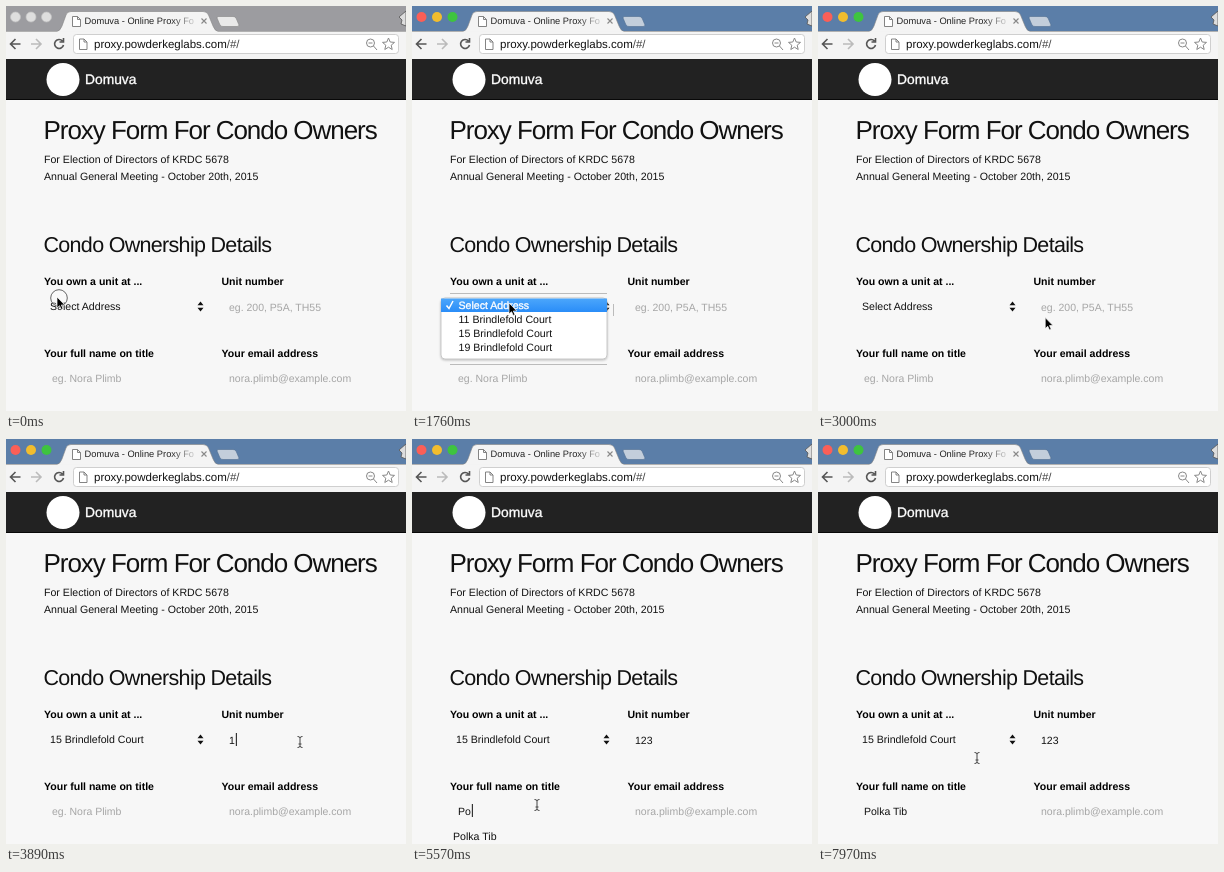
An HTML page that plays this animation: 400 by 405 pixels, repeating every 8000 ms.

```html
<!DOCTYPE html>
<html lang="en">
<head>
<meta charset="utf-8">
<title>Proxy form</title>
<style>
  html, body { margin: 0; width: 100%; height: 100%; overflow: hidden; background: #f7f7f7; }
  svg { display: block; font: 10.6px "Liberation Sans", Arial, sans-serif; fill: #111; text-rendering: geometricPrecision; }
  text { white-space: pre; }
  .label { font-weight: bold; font-size: 10.55px; fill: #000; }
  .field { font-size: 10.5px; }
  .hint { fill: #a6a6a6; }
  .line { fill: none; stroke: #555; stroke-width: 1.6; }
  #strip { fill: #9c9ca0; }
  .active #strip { fill: #5b7ea8; }
  .light { fill: #dedede; stroke: #c2c2c2; stroke-width: .7; }
  .active .light { fill: var(--on); stroke: none; }
  .shape { fill: #f4f4f4; stroke: #858585; stroke-width: .6; }
  #newTab { fill: #e9e9e9; }
  .active #newTab { fill: #c3cedb; stroke: #4f6d91; }
</style>
</head>
<body>
<svg id="stage" width="400" height="405" viewBox="0 0 400 405">
  <defs>
    <linearGradient id="fade" gradientUnits="userSpaceOnUse" x1="165" x2="189">
      <stop stop-color="#222"/><stop offset="1" stop-color="#222" stop-opacity=".15"/>
    </linearGradient>
    <linearGradient id="blue" x2="0" y2="1">
      <stop stop-color="#4ba6fb"/><stop offset="1" stop-color="#2a8df8"/>
    </linearGradient>
    <filter id="shadow" x="-10%" y="-10%" width="120%" height="130%">
      <feDropShadow dx="0" dy="1" stdDeviation="1" flood-opacity=".25"/>
    </filter>
  </defs>

  <!-- Browser window -->
  <rect width="400" height="405" fill="#f7f7f7"/>
  <rect id="strip" width="400" height="26"/>
  <circle class="light" style="--on:#fb5f57" cx="9.5" cy="11" r="5"/>
  <circle class="light" style="--on:#f2bd2e" cx="25" cy="11" r="5"/>
  <circle class="light" style="--on:#3ec43f" cx="40.5" cy="11" r="5"/>
  <rect y="25" width="400" height="28" fill="#f4f4f4"/>
  <path class="shape" d="M0 25.5H51Q54 25 56 20L60 9Q61 5.5 65 5.5H197Q201 5.5 202.5 9L207 20Q209 25 212 25.5H400"/>
  <path id="newTab" class="shape" d="M212 10.5H227Q229 10.5 230 12L233 19Q233 20.5 231 20.5H217Q215 20.5 214 19L211 12Q211 10.5 212 10.5Z"/>
  <path d="M66.5 10.500H71.5L74.5 13.5V20.5H66.5ZM71.5 10.5V13.5H74.5" fill="#fff" stroke="#777" stroke-width=".9"/>
  <text x="78.5" y="18" font-size="9.3" fill="url(#fade)">Domuva - Online Proxy Fo</text>
  <path class="line" d="M195.5 12.5L200.5 17.5M200.5 12.5L195.5 17.5" style="stroke:#888;stroke-width:1.1"/>
  <path d="M400 5L393 11L396 14L395 18L400 20Z" fill="#ddd" stroke="#555" stroke-width=".8"/>
  <path class="line" d="M14.5 38H5M9.5 33L4.5 38L9.5 43"/>
  <path class="line" d="M25 38H34.5M30 33L35 38L30 43" style="stroke:#bbb"/>
  <path class="line" d="M56.5 35A4.5 4.5 0 1 0 57.5 39M57.5 32V36H53.5"/>
  <rect x="67.5" y="28.5" width="325" height="19" rx="3" fill="#fff" stroke="#c4c4c4" stroke-width=".8"/>
  <path d="M73.5 33H78L81 36V43.5H73.5ZM78 33V36H81" fill="#fff" stroke="#777" stroke-width=".9"/>
  <text x="88" y="42" font-size="11.5">proxy.powderkeglabs.com<tspan fill="#444">/#/</tspan></text>
  <g class="line" style="stroke:#888;stroke-width:1">
    <circle cx="364.5" cy="37" r="4"/><path d="M367.5 40L371 44M362.500 37H366.5"/>
    <path d="M382.5 32L384.2 36L388.5 36.4L385.2 39.2L386.2 43.5L382.5 41.2L378.8 43.5L379.8 39.2L376.5 36.4L380.8 36Z"/>
  </g>

  <!-- Page -->
  <rect y="53" width="400" height="41" fill="#222"/>
  <rect y="93" width="400" height="1" fill="#080808"/>
  <circle cx="57" cy="73.5" r="16.5" fill="#fff"/>
  <text x="79" y="78" font-size="13.8" fill="#fff" stroke="#fff" stroke-width=".35">Domuva</text>
  <text x="37.5" y="133" font-size="26" letter-spacing="-1.04">Proxy Form For Condo Owners</text>
  <text x="38" y="157">For Election of Directors of KRDC 5678</text>
  <text x="38" y="174">Annual General Meeting - October 20th, 2015</text>
  <text x="37.5" y="246" font-size="21.5" letter-spacing="-.69">Condo Ownership Details</text>
  <text class="label" x="38" y="278.5">You own a unit at ...</text>
  <text class="label" x="215.5" y="278.5">Unit number</text>
  <text class="label" x="38" y="350.5">Your full name on title</text>
  <text class="label" x="215.5" y="350.5">Your email address</text>
  <text id="address" x="44" y="304"></text>
  <path d="M191.5 299.3L194.5 295.5L197.5 299.3ZM191.5 301.7L194.5 305.5L197.5 301.7Z"/>
  <text id="unit" class="field" x="223" y="304.5"></text>
  <text id="name" class="field" x="46" y="375.5"></text>
  <text class="field hint" x="223" y="375.5">nora.plimb@example.com</text>
  <text id="suggestion" x="41" y="401">Polka Tib</text>
  <rect id="caret" width="1" height="13"/>

  <g id="menu">
    <path d="M38 287.5H195M201.5 298V310M38 358.5H195" fill="none" stroke="#bbb"/>
    <rect x="29" y="292" width="166" height="61" rx="4" fill="#fff" stroke="#b4b4b4" stroke-width=".7" filter="url(#shadow)"/>
    <rect id="highlight" x="29" width="166" height="13.5" fill="url(#blue)"/>
    <path id="check" d="M34.5 299.5L37 302.5L41 295" fill="none" stroke-width="1.5"/>
    <g id="options"></g>
  </g>

  <!-- Pointer -->
  <circle id="ring" r="8.3" fill="#fff" fill-opacity=".25" stroke="#555" stroke-width=".9"/>
  <path id="arrow" d="M0 0V11L2.5 8.7L4.3 12.5L6 11.7L4.3 8H7.8Z" fill="#000" stroke="#fff" stroke-width=".7"/>
  <path id="beam" d="M-2.5 -5.5Q0 -5.5 0 -4Q0 -5.5 2.5 -5.5M0 -4V4M-2.5 5.5Q0 5.5 0 4Q0 5.5 2.5 5.5M-1.5 2H1.5" fill="none" stroke="#444"/>
</svg>
<script>
const LOOP = 8000;
const STEP = 88.6;
const ROW = 14;
const MENU_TOP = 292.5;
const FULL_NAME = 'Polka Tib';
const choices = ['Select Address', ...[11, 15, 19].map(n => `${n} Brindlefold Court`)];
const unitKeys = [3810, 3900, 3990];
const nameKeys = [5310, 5570, 5660, 5750, 5840, 6010, 6100, 6360, 6540];
const clicks = [0, 1150, 1410, 2570, 3270, 4610];

// time, x, y
const pointerPath = [
  [0, 51, 291], [440, 65, 321], [880, 89, 301], [1060, 95, 295],
  [1410, 95, 295], [1760, 97, 297], [1950, 97, 297], [2300, 76, 321],
  [2740, 76, 321], [3000, 224, 312], [3270, 294, 303], [3990, 294, 303],
  [4430, 118, 368], [4620, 118, 368], [4780, 125, 366],
  [7890, 125, 366], [7970, 159, 319], [LOOP, 159, 319]
];

const $ = id => document.getElementById(id);
const between = (t, from, to) => t >= from && t < to;
const show = (id, visible) => $(id).style.display = visible ? '' : 'none';
const place = (id, x, y) => $(id).setAttribute('transform', `translate(${x} ${y})`);

$('options').innerHTML = choices
  .map((choice, i) => `<text x="46.5" y="${303.2 + i * ROW}" stroke-width=".35">${choice}</text>`).join('');

function pointerAt(time) {
  const t = Math.floor((time + 14) / STEP) * STEP;
  const i = pointerPath.findIndex(key => key[0] > t);
  const [t0, x0, y0] = pointerPath[i - 1];
  const [t1, x1, y1] = pointerPath[i];
  const p = (t - t0) / (t1 - t0);
  return [x0 + (x1 - x0) * p, y0 + (y1 - y0) * p];
}

function typeInto(id, value, keys, hint, t) {
  const typed = value.slice(0, keys.filter(key => key <= t).length);
  $(id).textContent = typed || hint;
  $(id).classList.toggle('hint', !typed);
  return typed ? $(id).getComputedTextLength() + 1 : 0;
}

function drawMenu(t, pointerY) {
  show('menu', between(t, 1410, 2830));
  const selected = Math.max(0, Math.floor((pointerY - MENU_TOP) / ROW));
  $('highlight').setAttribute('y', MENU_TOP + selected * ROW);
  [...$('options').children].forEach((option, i) => {
    option.setAttribute('fill', i === selected ? '#fff' : '#111');
    option.setAttribute('stroke', i === selected ? '#fff' : 'none');
  });
  $('check').setAttribute('stroke', selected ? '#222' : '#fff');
  $('address').textContent = choices[t < 3090 ? 0 : 2];
}

function drawFields(t) {
  const unitWidth = typeInto('unit', '123', unitKeys, 'eg. 200, P5A, TH55', t);
  const nameWidth = typeInto('name', FULL_NAME, nameKeys, 'eg. Nora Plimb', t);
  show('suggestion', between(t, 5310, 6980));

  let caret = null;
  if (between(t, 3360, 4430)) caret = [223 + unitWidth, 294];
  else if (between(t, 4610, 5040) || between(t, 5310, 6980)) caret = [46 + nameWidth, 365];
  else if (between(t, 7070, 7610)) caret = [223, 365];
  show('caret', caret);
  if (caret) place('caret', ...caret);
}

function drawPointer(t, x, y) {
  const overText = t >= 3090;
  show('arrow', !overText);
  show('beam', overText);
  place(overText ? 'beam' : 'arrow', x, y);
  show('ring', clicks.some(click => between(t, click, click + 80)));
  place('ring', overText ? x : x + 2, overText ? y : y + 1);
}

function frame(now) {
  const t = now % LOOP;
  const [x, y] = pointerAt(t);
  $('stage').classList.toggle('active', t >= 1150);
  drawMenu(t, y);
  drawFields(t);
  drawPointer(t, x, y);
  requestAnimationFrame(frame);
}
frame(performance.now());
</script>
</body>
</html>
```
